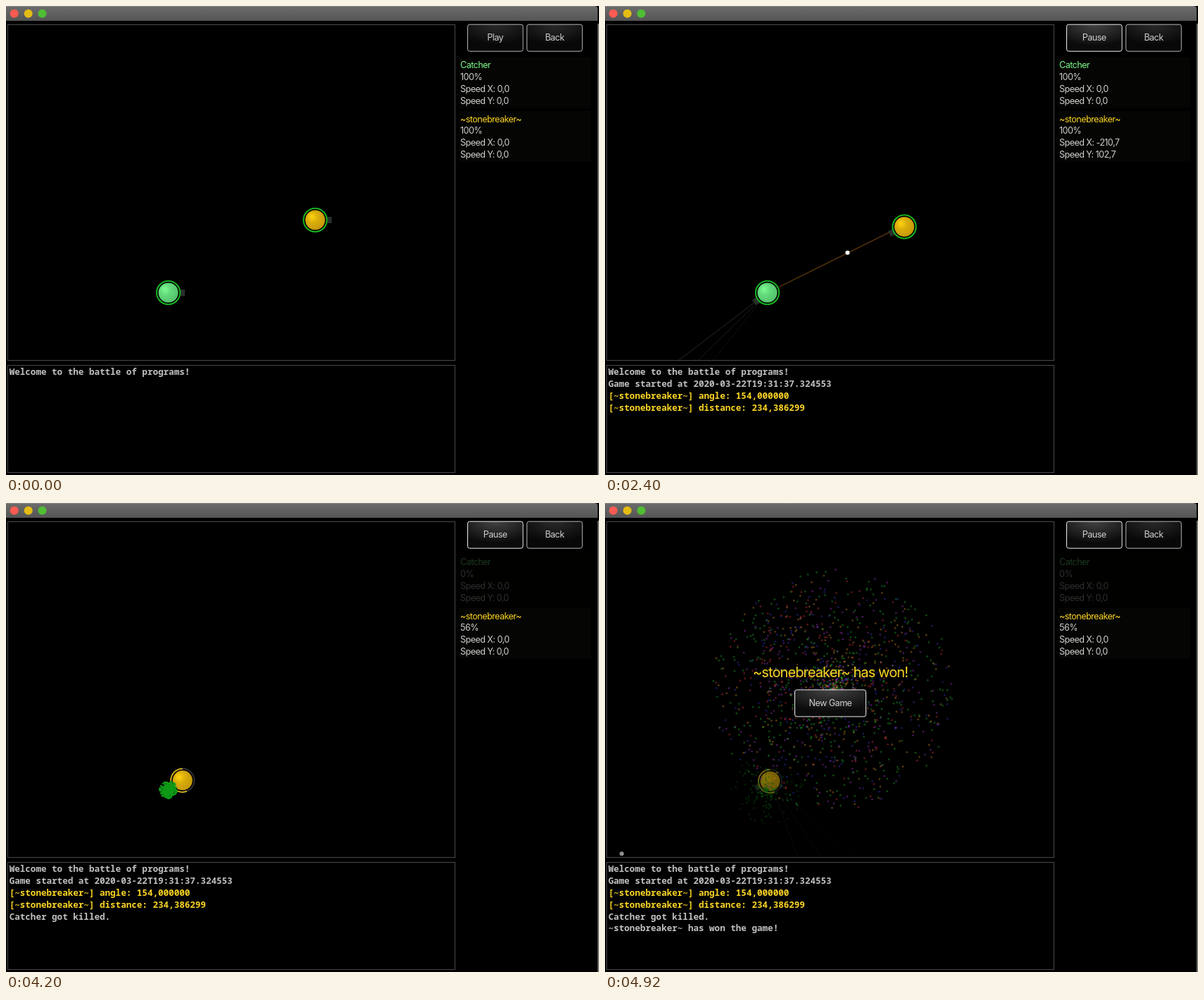
Animation of 842x665 px, one loop 4980 ms. Source, as an HTML page with a canvas:

```html
<!DOCTYPE html>
<html lang="en">
<head>
<meta charset="utf-8">
<title>Battle of programs</title>
<style>
  html, body { margin: 0; width: 100%; height: 100%; overflow: hidden; background: #000; }
  canvas, svg { position: absolute; left: 0; top: 0; display: block; }
  text { font: 12.6px Inter, "Open Sans", sans-serif; letter-spacing: -.045em; fill: #cfcfcf; white-space: pre; }
  .log text { font: 600 12.58px "Noto Sans Mono", "DejaVu Sans Mono", monospace; letter-spacing: 0; fill: #c0c0c0; }
  .mid { text-anchor: middle; }
  .btn { fill: url(#dark); stroke: #b4b4b4; }
  .btn.on { fill: url(#lit); stroke: #ececec; }
  .box { fill: none; stroke: #484848; }
  .panel { fill: #050503; }
  .green { fill: #7dfa8c; }
  .gold, .log .gold { fill: #fbd524; }
  .big { font-size: 20px; }
  .off { display: none; }
</style>
</head>
<body>
<canvas id="arena" width="842" height="665"></canvas>
<svg width="842" height="665" viewBox="0 0 842 665">
  <defs>
    <linearGradient id="bar" x1="0" y1="0" x2="0" y2="1">
      <stop offset="0" stop-color="#6c6c6c"/><stop offset="1" stop-color="#555"/>
    </linearGradient>
    <radialGradient id="dark" cx=".5" cy="0" r=".75">
      <stop offset="0" stop-color="#2b2b2b"/><stop offset="1" stop-color="#080808"/>
    </radialGradient>
    <radialGradient id="lit" cx=".5" cy="0" r=".8">
      <stop offset="0" stop-color="#444"/><stop offset="1" stop-color="#0b0b0b"/>
    </radialGradient>
  </defs>

  <path d="M0 0H836Q840 0 840 4V21H0Z" fill="url(#bar)"/>
  <path d="M0 .5H836" stroke="#858585"/>
  <path d="M841 25V665" stroke="#a4a4a4" stroke-width="1.4"/>
  <circle cx="11.7" cy="10.8" r="6" fill="#fc5b52"/>
  <circle cx="31.7" cy="10.8" r="6" fill="#e3bc14"/>
  <circle cx="51.5" cy="10.8" r="6" fill="#4fbe34"/>

  <rect class="box" x="2.5" y="26.5" width="635" height="476"/>
  <rect class="box" x="2.5" y="509.5" width="635" height="152"/>

  <rect id="play" class="btn" x="655.5" y="26.2" width="78.6" height="38" rx="3"/>
  <text id="playText" class="mid" x="694.7" y="49.3">Play</text>
  <rect class="btn" x="739.7" y="26.2" width="78.6" height="38" rx="3"/>
  <text class="mid" x="779" y="49.3">Back</text>

  <g id="card1">
    <rect class="panel" x="643" y="73" width="188" height="72"/>
    <text class="green" x="645" y="88.3">Catcher</text>
    <text id="hp1" x="645" y="105.2"></text>
    <text x="645" y="122">Speed X: 0,0</text>
    <text x="645" y="138.9">Speed Y: 0,0</text>
  </g>
  <g>
    <rect class="panel" x="643" y="149" width="188" height="72"/>
    <text class="gold" x="645" y="164.5">~stonebreaker~</text>
    <text id="hp2" x="645" y="181.4"></text>
    <text id="vx" x="645" y="198.2"></text>
    <text id="vy" x="645" y="215.1"></text>
  </g>

  <g class="log" id="log"></g>

  <g id="win">
    <text class="gold big mid" x="320" y="247">~stonebreaker~ has won!</text>
    <rect class="btn on" x="269.5" y="264.9" width="101" height="38" rx="3"/>
    <text class="mid" x="320" y="288.3">New Game</text>
  </g>
</svg>
<script>
const LOOP = 4980, TICK = 60, RAD = Math.PI / 180;
const START = 960, FOUND = 2200, CRASH = 4120, WIN = 4215, RESCAN = 4490;
const HEADING = 154, BULLET_SPEED = .482;
const hero = { x: 230.5, y: 406.5 };
const $ = id => document.getElementById(id);
const ctx = $('arena').getContext('2d');

const log = [
  [0, 'Welcome to the battle of programs!'],
  [START, 'Game started at 2020-03-22T19:31:37.324553'],
  [FOUND, '[~stonebreaker~] angle: 154,000000', 'gold'],
  [FOUND, '[~stonebreaker~] distance: 234,386299', 'gold'],
  [CRASH, 'Catcher got killed.'],
  [WIN, '~stonebreaker~ has won the game!']
].map(([from, line, cls = ''], i) => {
  const el = document.createElementNS('http://www.w3.org/2000/svg', 'text');
  el.textContent = line;
  el.setAttribute('x', 4.7);
  el.setAttribute('y', 523.2 + 16.85 * i);
  el.setAttribute('class', cls);
  $('log').append(el);
  return { from, el };
});

// Keys are [time, value, value...]; linear between them, held at both ends.
function track(keys, t, i = 1) {
  if (t <= keys[0][0]) return keys[0][i];
  for (let k = 1; k < keys.length; k++) {
    const a = keys[k - 1], b = keys[k];
    if (t <= b[0]) return a[i] + (b[i] - a[i]) * (t - a[0]) / (b[0] - a[0]);
  }
  return keys[keys.length - 1][i];
}
const heroScan = [[START, 0], [1560, 55.9], [2400, 142.7], [3120, 211.3], [3840, 285.1], [CRASH, 313]];
const ramScan = [[START, 0], [1560, 79.5], [FOUND, HEADING]];
const lateScan = [[RESCAN, -4], [4500, -2], [4920, 70]];
const ramPath = [[2250, 439, 303.5], [2400, 425, 313], [3120, 358.5, 345.5],
  [3840, 288, 380], [CRASH, 261.5, 392.5], [4320, 234.5, 394.5]];
const ramAt = t => ({ x: track(ramPath, t), y: track(ramPath, t, 2) });
const shots = [[2223, 2645], [2985, 3247], [3725, 3821], [4475, LOOP]];

const along = (p, deg, d) => ({ x: p.x + Math.cos(deg * RAD) * d, y: p.y + Math.sin(deg * RAD) * d });

let seed = 7;
const rnd = () => (seed = seed * 16807 % 2147483647) / 2147483647;
const burst = (n, power, hues) => Array.from({ length: n }, () => ({
  angle: rnd() * 360, speed: rnd() ** power, color: hues[rnd() * hues.length | 0]
}));
const fireworks = burst(1500, 1.1, ['#d8303c', '#1fae2c', '#3a34cc', '#9c34c4', '#c88a24', '#1fae2c']);
const debris = burst(330, 1.25, ['#0f9a18']);

function disc(p, r, fill, alpha = 1) {
  ctx.globalAlpha = Math.min(1, Math.max(0, alpha));
  ctx.fillStyle = fill;
  ctx.beginPath();
  ctx.arc(p.x, p.y, r, 0, 7);
  ctx.fill();
  ctx.globalAlpha = 1;
}

function ray(from, to, color, width = 1.3) {
  ctx.strokeStyle = color;
  ctx.lineWidth = width;
  ctx.beginPath();
  ctx.moveTo(from.x, from.y);
  ctx.lineTo(to.x, to.y);
  ctx.stroke();
}

// The newest beam and two fading ones behind it.
function scan(p, angle, step, min, glow) {
  for (let k = 0; k < 3; k++) {
    const a = angle - k * step;
    if (a >= min) ray(p, along(p, a, 900), `rgba(255,255,255,${glow * (1 - .32 * k)})`);
  }
}

function ring(p, from, to, color) {
  ctx.strokeStyle = color;
  ctx.lineWidth = 1.9;
  ctx.beginPath();
  ctx.arc(p.x, p.y, 16.6, from * RAD, to * RAD);
  ctx.stroke();
}

function player(p, gun, hp, light, base, shade) {
  ctx.save();
  ctx.translate(p.x, p.y);
  ctx.rotate(gun * RAD);
  ctx.fillStyle = '#27302a';
  ctx.fillRect(16, -4.5, 7.5, 9);
  ctx.restore();
  disc(p, 17, '#000');
  ring(p, 0, 360, '#303030');
  ring(p, 270 - 3.6 * hp, 270, hp > 60 ? '#12b91a' : hp > 30 ? '#c8a81e' : '#c83c38');
  const g = ctx.createRadialGradient(p.x - 5, p.y - 5, 1, p.x - 3, p.y - 3, 17);
  g.addColorStop(0, light);
  g.addColorStop(.45, base);
  g.addColorStop(1, shade);
  disc(p, 14, g);
}

function flare(p, age, grow, life) {
  if (age >= 0 && age < life) disc(p, 3 + age * grow, '#d8222c', 2 - 2 * age / life);
}

function drawArena(t, hp1, hp2) {
  const ram = ramAt(t), alive = t < CRASH;
  ctx.clearRect(0, 0, 842, 665);
  ctx.save();
  ctx.beginPath();
  ctx.rect(3, 27, 634, 475);
  ctx.clip();

  const gun = track(heroScan, t);
  if (t >= START && alive) scan(hero, gun, 7, 0, .1);
  if (t >= START && t < FOUND) scan(ram, track(ramScan, t), 11.5, 0, .1);
  if (t >= RESCAN) scan(ram, track(lateScan, t), 14, -4, .06);

  const seen = t - FOUND;
  if (seen >= 0 && seen < 450)
    ray(along(hero, HEADING - 180, 18), ramAt(0), `rgba(205,122,32,${.72 * (1 - seen / 450)})`, 1.6);

  if (alive) player(hero, gun, hp1, '#7af890', '#62d97b', '#56c46d');
  flare({ x: 244, y: 399 }, t - CRASH, .06, 660);
  player(ram, t < FOUND ? 0 : HEADING, hp2, '#fbd00e', '#d9ad0b', '#c69a0a');

  for (const [fired, hit] of shots) {
    if (t >= fired && t < hit)
      disc(along(ramAt(fired), HEADING, 20 + (t - fired) * BULLET_SPEED), 3, '#fff');
    flare({ x: 241, y: 403 }, t - hit, .03, 260);
  }

  if (!alive) {
    const age = t - CRASH;
    for (const d of debris) {
      const fade = 1 - age / (450 + 600 * (1 - d.speed));
      if (fade > 0) disc(along(hero, d.angle, d.speed * age * .155), 1.4, d.color, .25 + 1.2 * fade);
    }
  }
  if (t >= WIN) {
    const age = t - WIN;
    ctx.fillStyle = 'rgba(0,0,0,.43)';
    ctx.fillRect(0, 0, 640, 510);
    for (const f of fireworks)
      disc(along({ x: 323, y: 265.5 }, f.angle, f.speed * age * .243), 1.4, f.color, .62 - age * .0003);
  }
  ctx.restore();
}

function draw() {
  const t = Math.floor(performance.now() % LOOP / TICK) * TICK;
  const alive = t < CRASH, playing = t >= START;
  const hits = shots.filter(s => t >= s[1]).length;
  const hp1 = alive ? [100, 76, 51, 25][hits] : 0, hp2 = alive ? 100 : 56;
  const moving = t >= FOUND && alive;

  drawArena(t, hp1, hp2);
  $('play').classList.toggle('on', playing);
  $('playText').textContent = playing ? 'Pause' : 'Play';
  $('hp1').textContent = hp1 + '%';
  $('hp2').textContent = hp2 + '%';
  $('vx').textContent = 'Speed X: ' + (moving ? '-210,7' : '0,0');
  $('vy').textContent = 'Speed Y: ' + (moving ? '102,7' : '0,0');
  $('card1').setAttribute('opacity', alive ? 1 : .22);
  $('win').classList.toggle('off', t < WIN);
  for (const l of log) l.el.classList.toggle('off', t < l.from);
  requestAnimationFrame(draw);
}
draw();
</script>
</body>
</html>
```
